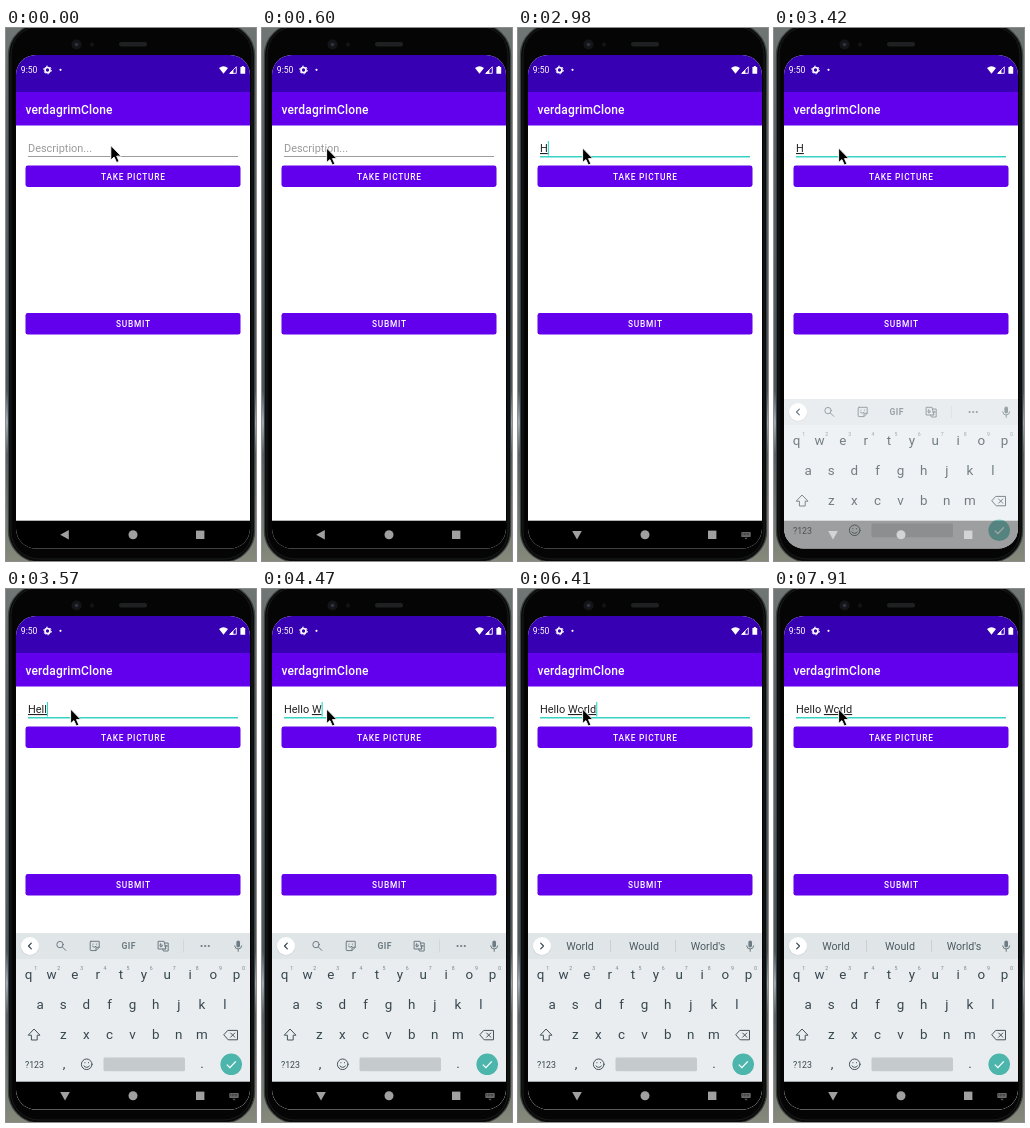
An HTML page for the animation above (8 s loop, 250 by 533 pixels).

```html
<!DOCTYPE html>
<html lang="en">
<head>
<meta charset="utf-8">
<title>Typing a description</title>
<style>
  html, body { margin: 0; width: 100%; height: 100%; overflow: hidden; background: #6b7270; }
  svg { display: block; width: 100%; height: 100%; }
  text { font-family: Roboto, Arial, sans-serif; white-space: pre; }
  .mid { text-anchor: middle; }
  .title { font-size: 12px; font-weight: 500; letter-spacing: .15px; fill: #fff; }
  .button { font-size: 8.35px; font-weight: 500; letter-spacing: .75px; fill: #fff; text-anchor: middle; }
  .field { font-size: 10.95px; fill: #222; }
  .word { text-decoration: underline; text-decoration-thickness: .6px; text-underline-offset: 1.2px; }
  .key { font-size: 13.4px; fill: #37474f; text-anchor: middle; }
  .digit { font-size: 5.2px; fill: #78868d; text-anchor: middle; }
  .hint { font-size: 10.7px; fill: #4b5a61; text-anchor: middle; }
  .line { fill: none; stroke: #6d7b82; stroke-width: 1; stroke-linecap: round; stroke-linejoin: round; }
</style>
</head>
<body>
<svg viewBox="0 0 250 533" preserveAspectRatio="none">
  <defs>
    <clipPath id="screen"><rect x="10" y="27" width="234" height="493.5" rx="20"/></clipPath>
    <linearGradient id="wall" x2="0" y2="1">
      <stop offset="0" stop-color="#6f7674"/><stop offset=".2" stop-color="#5b666b"/>
      <stop offset=".68" stop-color="#4b5a63"/><stop offset=".74" stop-color="#9fb2bd"/>
      <stop offset=".8" stop-color="#596368"/><stop offset="1" stop-color="#85897b"/>
    </linearGradient>
  </defs>

  <!-- Phone body -->
  <rect width="250" height="533" fill="url(#wall)"/>
  <rect x="2.5" y="-4" width="246" height="538" rx="31" fill="#090909" stroke="#3c403f" stroke-width="1.2"/>
  <rect x="5" y="-1.5" width="241" height="532.5" rx="28" fill="#050505" stroke="#1f2121" stroke-width=".8"/>
  <circle cx="70.5" cy="16.5" r="5" fill="#141518"/>
  <circle cx="70.5" cy="16.5" r="1.8" fill="#30333f"/>
  <circle cx="86" cy="16.5" r="2.2" fill="#121316"/>
  <rect x="113" y="14" width="28" height="4.5" rx="2.2" fill="#1f2021"/>

  <g clip-path="url(#screen)">
    <rect x="10" y="27" width="235" height="494" fill="#fff"/>
    <rect x="10" y="27" width="235" height="37" fill="#3700b3"/>
    <rect x="10" y="64" width="235" height="33.5" fill="#6200ee"/>

    <!-- Status bar -->
    <g fill="#fff">
      <text x="14.8" y="45.2" font-size="8.6">9:50</text>
      <circle cx="41.5" cy="42" r="2.5" fill="none" stroke="#fff" stroke-width="1.7"/>
      <circle cx="41.5" cy="42" r="3.8" fill="none" stroke="#fff" stroke-width="1" stroke-dasharray="1.9 2.08"/>
      <circle cx="54.5" cy="41.8" r="1.1"/>
      <path d="M213 40Q217.5 36.6 222 40L217.5 45.7Z"/>
      <path d="M223.8 45.3L230.3 38.8V45.3Z" fill="none" stroke="#fff" stroke-width=".9"/>
      <path d="M223.2 45.7L227.4 41.5V45.7Z"/>
      <path d="M234.4 39H235.8V38H237.8V39H239.2V45.8H234.4Z"/>
    </g>
    <text class="title" x="19.5" y="85.5">verdagrimClone</text>

    <!-- Form -->
    <rect x="22" y="128.2" width="210" height=".8" fill="#858585"/>
    <rect id="focus" x="22" y="128.1" width="210" height="1.4" fill="#2fd8c8"/>
    <text id="hint" class="field" x="22" y="124" style="fill:#9a9a9a">Description...</text>
    <text id="field" class="field" x="22" y="124"><tspan id="done"></tspan><tspan id="word" class="word"></tspan></text>
    <rect id="caret" y="113" width="1.1" height="14.5" fill="#2fd8c8"/>
    <g fill="#6200ee">
      <rect x="19.5" y="137.5" width="215" height="21.5" rx="2.4"/>
      <rect x="19.5" y="285.1" width="215" height="21.5" rx="2.4"/>
    </g>
    <text class="button" x="127.4" y="151.9">TAKE PICTURE</text>
    <text class="button" x="127.4" y="299.4">SUBMIT</text>

    <!-- Keyboard -->
    <g id="keyboard">
      <rect x="10" y="344" width="235" height="180" fill="#e9edef"/>
      <rect x="10" y="344" width="235" height="26" fill="#e0e5e8"/>
      <circle cx="24" cy="357.4" r="9.2" fill="#c9d0d3"/>
      <circle cx="24" cy="357" r="9" fill="#fff"/>
      <path id="chevron" class="line" d="M1.3 -2.8L-1.5 0L1.3 2.8" style="stroke:#37474f;stroke-width:1.2"/>
      <g id="tools" class="line">
        <circle cx="54" cy="355.6" r="3.2"/><path d="M56.4 358L59.8 361.4"/>
        <path d="M85 352.3H93.2V358.4L90 361.6H85Q84.2 361.6 84.2 360.8V353Q84.2 352.3 85 352.3ZM93 358.3H90V361.4M86.4 357.2Q88 359.6 90 357.4M87 355V355.2M90.4 355V355.2"/>
        <path d="M152.5 352.3H158L160 360H152.5ZM158.6 354H162.2V362H157.4L156.6 360M154.2 356H156.4Q156.4 358 154.6 358Q153.4 357 154.6 354.6M158.8 357H161.4M160.2 356.4L159 360"/>
        <text x="122.7" y="360.2" class="mid" font-size="8.6" font-weight="700" letter-spacing=".4" style="fill:#6d7b82;stroke:none">GIF</text>
        <g style="fill:#6d7b82;stroke:none"><circle cx="195.6" cy="357" r="1.1"/><circle cx="199.2" cy="357" r="1.1"/><circle cx="202.8" cy="357" r="1.1"/></g>
        <path d="M177.5 351V363" style="stroke:#cdd4d7;stroke-width:.8"/>
      </g>
      <g id="words">
        <text class="hint" x="62" y="360.8">World</text>
        <text class="hint" x="126" y="360.8">Would</text>
        <text class="hint" x="190" y="360.8">World's</text>
        <path d="M92.5 351V363M157.5 351V363" stroke="#c3cacd" stroke-width=".8"/>
      </g>
      <rect x="230.4" y="351.5" width="3.6" height="7" rx="1.8" fill="#6d7b82"/>
      <path class="line" d="M228.7 356.8Q229 360 232.2 360Q235.4 360 235.7 356.8M232.2 360V362.4"/>
      <g id="keys"></g>
      <g class="line" style="stroke:#45545b">
        <path d="M28.3 440.3L34 446.2H31.2V451H25.4V446.2H22.6Z"/>
        <path d="M222.2 441.4H231.5V450.8H222.2L218 446.1ZM224.6 444L228.8 448.2M228.8 444L224.6 448.2"/>
        <circle cx="80.7" cy="475.3" r="5.3"/>
        <path d="M78 477Q80.7 480 83.4 477M78.9 473.6V473.8M82.5 473.6V473.8"/>
      </g>
      <text x="28.5" y="478.6" class="mid" font-size="8.8" fill="#37474f">?123</text>
      <rect x="97.5" y="468.6" width="81.5" height="13.6" rx="1.5" fill="#c5cacd"/>
      <circle cx="225.2" cy="475.3" r="10.8" fill="#4db6ac"/>
      <path d="M220.8 475.6L223.9 478.6L229.8 472.4" fill="none" stroke="#fff" stroke-width="1.3"/>
    </g>

    <!-- Navigation bar -->
    <rect id="nav" x="10" y="492.7" width="235" height="29"/>
    <g id="navIcons" fill="#a0a0a0">
      <path id="back" d="M-4.8 0L3.8 -4.8V4.8Z"/>
      <circle cx="127" cy="506.8" r="4.5"/>
      <rect x="190" y="502.6" width="8.4" height="8.4"/>
      <g id="switcher" fill="#6a6a6a">
        <rect x="223.3" y="504" width="9.4" height="5" rx=".7"/>
        <path d="M224.4 505.4H231.8M224.4 506.8H231.8" stroke="#111" stroke-width=".7" stroke-dasharray=".8 .7"/>
        <path d="M226.4 509.8H229.6L228 511.4Z"/>
      </g>
    </g>
  </g>

  <path id="pointer" d="M0 0V14.6L3.3 11.6L5.8 17L8.3 15.9L5.9 10.6H10.3Z" fill="#000" stroke="#fff" stroke-width=".9"/>
</svg>
<script>
const $ = id => document.getElementById(id);
const LOOP = 8000;

// Each step changes only the listed properties, from its time on.
const start = {
  x: 104.8, y: 117.5, focus: 0, caret: 0, done: '', word: '',
  turn: 0, switcher: 0, keyboard: 0, slide: 0, nav: 1, words: 0
};
const steps = [
  [450, { x: 70, y: 121 }],
  [600, { x: 64.6, y: 120 }],
  [900, { focus: .5 }],
  [1040, { focus: 1, caret: 1 }],
  [1490, { caret: 0 }],
  [1930, { caret: 1 }],
  [2230, { turn: -30, switcher: .4 }],
  [2380, { turn: -70, switcher: .8, caret: 0 }],
  [2530, { turn: -90, switcher: 1 }],
  [2980, { word: 'H', caret: 1 }],
  [3420, { caret: 0, keyboard: .7, slide: 27, nav: .35, switcher: 0 }],
  [3570, { word: 'Hell', caret: 1, keyboard: 1, slide: 0, nav: 1, switcher: 1 }],
  [3720, { done: 'Hello ', word: '' }],
  [4170, { caret: 0 }],
  [4470, { word: 'W', caret: 1 }],
  [4920, { caret: 0 }],
  [5070, { word: 'Woe', caret: 1 }],
  [5510, { caret: 0 }],
  [5810, { word: 'Wo', caret: 1 }],
  [5960, { word: 'Wor' }],
  [6110, { word: 'Worl' }],
  [6260, { word: 'World', words: .5 }],
  [6410, { words: 1 }],
  [6860, { caret: 0 }],
  [7310, { caret: 1 }],
  [7910, { caret: 0 }]
];

function addKey(label, x, y, cls = 'key') {
  const t = document.createElementNS('http://www.w3.org/2000/svg', 'text');
  t.setAttribute('x', x);
  t.setAttribute('y', y);
  t.setAttribute('class', cls);
  t.textContent = label;
  $('keys').append(t);
}

function addRow(letters, x, y, cls) {
  [...letters].forEach((c, i) => addKey(c, x + i * 23.1, y, cls));
}

addRow('qwertyuiop', 22.5, 389.8);
addRow('asdfghjkl', 34.2, 420);
addRow('zxcvbnm', 57.3, 450);
addRow('1234567890', 29.6, 380.8, 'digit');
addKey(',', 58, 479);
addKey('.', 196, 479);

const fade = (id, v) => $(id).setAttribute('opacity', v);
const move = (id, x, y, turn = 0) =>
  $(id).setAttribute('transform', `translate(${x} ${y}) rotate(${turn})`);

function draw(s) {
  move('pointer', s.x, s.y);
  fade('focus', s.focus);
  fade('hint', s.done || s.word ? 0 : 1);
  $('done').textContent = s.done;
  $('word').textContent = s.word;
  fade('caret', s.caret);
  $('caret').setAttribute('x', 22 + $('field').getComputedTextLength());
  move('back', 59, 506.8, s.turn);
  fade('switcher', s.switcher);
  fade('keyboard', s.keyboard);
  move('keyboard', 0, s.slide);
  fade('nav', s.nav);
  $('navIcons').setAttribute('fill', s.nav < 1 ? '#d2d4d5' : '#a0a0a0');
  fade('tools', 1 - s.words);
  fade('words', s.words);
  move('chevron', 24, 357, s.words * 180);
}

const began = performance.now();
let shown = -1;

function tick() {
  const t = (performance.now() - began) % LOOP;
  const past = steps.filter(([at]) => at <= t);
  if (past.length !== shown) {
    shown = past.length;
    draw(Object.assign({}, start, ...past.map(([, change]) => change)));
  }
  requestAnimationFrame(tick);
}
tick();
</script>
</body>
</html>
```
